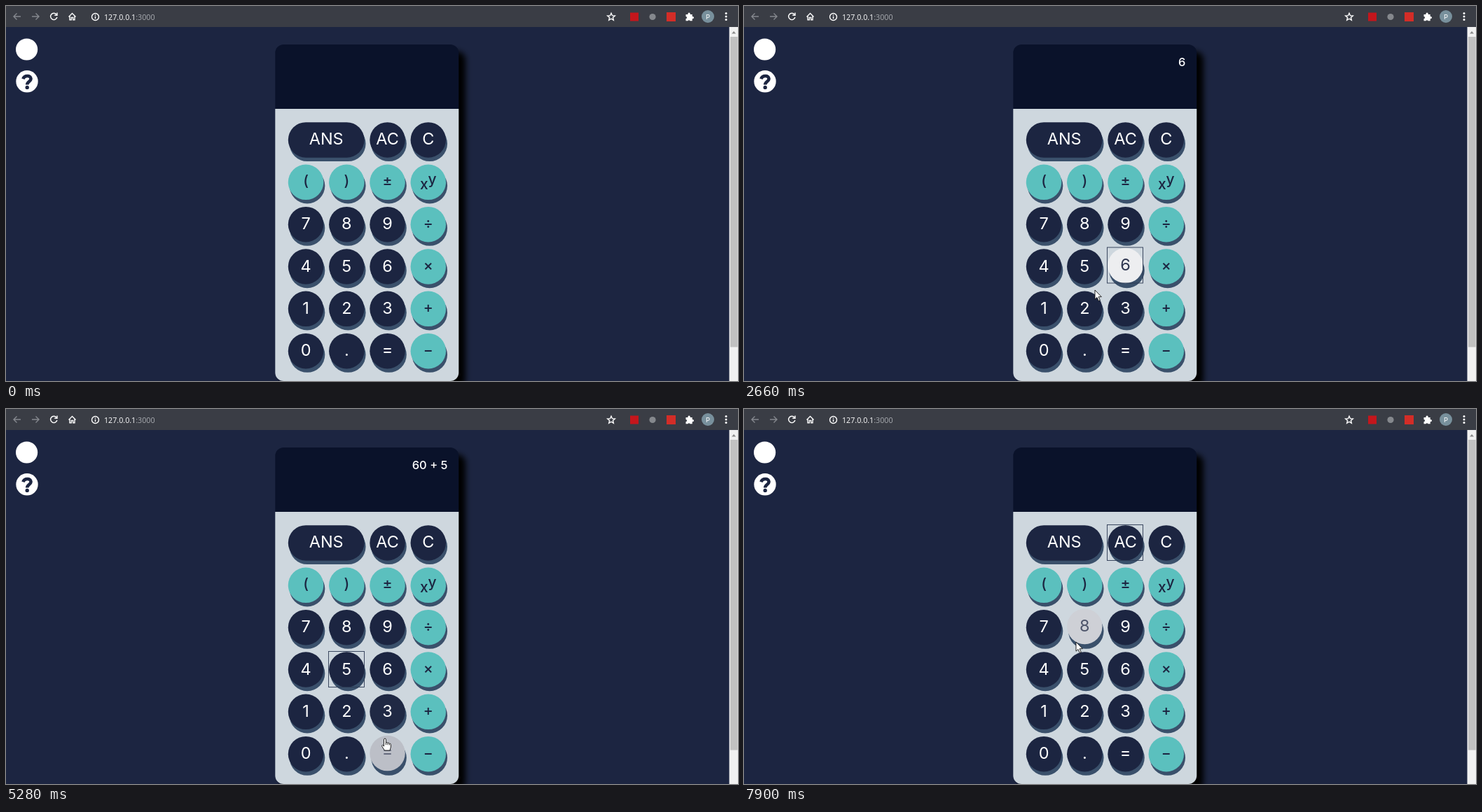
An HTML page that plays this animation: 1045 by 536 pixels, repeating every 8000 ms.

```html
<!DOCTYPE html>
<html lang="en">
<head>
<meta charset="utf-8">
<title>Calculator</title>
<style>
  html, body { margin: 0; width: 100%; height: 100%; overflow: hidden; background: #1c2541; }
  svg { display: block; width: 1045px; height: 536px; }
  text { font-family: Inter, "DejaVu Sans", sans-serif; white-space: pre; }
  .key text { text-anchor: middle; font-size: 23.5px; }
  .key.op text { font-size: 21px; font-weight: 500; }
  .key .shade { fill: #3a506b; }
  .key .focus { fill: none; stroke: #2c3952; stroke-width: .9; }
  .out { fill: #fff; text-anchor: end; font-weight: 500; }
  .url { font: 10.7px "Open Sans", "Noto Sans", sans-serif; fill: #fff; }
  .line { fill: none; stroke: #fff; stroke-width: 1.4; }
  .dim { stroke: #85888e; }
  #cursor path { fill: #fff; stroke: #111; stroke-width: .9; stroke-linejoin: round; }
</style>
</head>
<body>
<svg viewBox="0 0 1045 536">
  <defs>
    <filter id="soft" x="-20%" y="-20%" width="140%" height="140%"><feGaussianBlur stdDeviation="4.5"/></filter>
  </defs>
  <rect width="1045" height="536" fill="#1c2541"/>

  <!-- page links -->
  <circle cx="29.6" cy="62" r="15.6" fill="#fff"/>
  <circle cx="30" cy="107.8" r="15.7" fill="#fff"/>
  <path d="M24.4 104.2C26.2 98.6 35.6 98.8 35.6 104C35.6 108 30.2 108 30.2 112.4" fill="none" stroke="#1c2541" stroke-width="4.6"/>
  <circle cx="30.2" cy="116.4" r="2.7" fill="#1c2541"/>

  <!-- calculator body -->
  <rect x="394" y="65" width="262" height="481" rx="12" filter="url(#soft)"/>
  <path d="M384.3 147h262v377a12 12 0 0 1-12 12h-238a12 12 0 0 1-12-12z" fill="#ced7de"/>
  <path d="M384.3 147V67a12 12 0 0 1 12-12h238a12 12 0 0 1 12 12v80z" fill="#0a122a"/>
  <text class="out" id="expr" x="630.5" y="86" font-size="16.5"></text>
  <text class="out" id="result" x="630.5" y="124" font-size="29"></text>
  <g id="keys"></g>

  <!-- scrollbar -->
  <rect x="1032.5" y="30" width="12.5" height="506" fill="#f1f1f1"/>
  <rect x="1034" y="44" width="10.5" height="443.5" fill="#c1c1c1"/>
  <path d="M1036 39.5l3-3.5 3 3.5z" fill="#8a8a8a"/>

  <!-- browser bar -->
  <rect width="1045" height="30" fill="#3a3d45"/>
  <path class="line dim" d="M21 15H11M15.5 10.5L11 15l4.5 4.5M37 15h10M42.5 10.5L47 15l-4.5 4.5"/>
  <path class="line" d="M72 12a4.7 4.7 0 1 0 .9 4M73 9.5v3.7h-3.7"/>
  <path class="line" d="M89.5 15.5L94.5 10.5l5 5M91 14.5v5.3h2.3v-3.3h2.4v3.3H98v-5.3"/>
  <circle class="line" cx="127.5" cy="15.5" r="5"/>
  <path class="line" d="M127.5 14.7v3.5M127.5 12.4v1.4"/>
  <text class="url" x="140" y="19.5">127.0.0.1<tspan fill="#a9acb1">:3000</tspan></text>
  <path class="line" d="M864 10.2l1.5 3.5 3.8.3-2.9 2.5.9 3.7-3.3-2-3.3 2 .9-3.7-2.9-2.5 3.8-.3z"/>
  <rect x="891" y="9.5" width="12" height="12" fill="#c4161c"/>
  <circle cx="923" cy="15.5" r="4.6" fill="#85888d"/>
  <rect x="943" y="9" width="13" height="13" fill="#d32d27"/>
  <path d="M970.5 12h3v-1a1.6 1.6 0 0 1 3.2 0v1h3v3h.7a1.6 1.6 0 0 1 0 3.2h-.7v3h-3.2a1.6 1.6 0 0 0-3 0h-3v-3a1.6 1.6 0 0 0 0-3.2z" fill="#fff"/>
  <circle cx="1002" cy="15" r="9" fill="#78909c"/>
  <text x="1002" y="18.5" font-size="9.5" fill="#fff" text-anchor="middle">P</text>
  <g fill="#fff"><circle cx="1028" cy="10.5" r="1.5"/><circle cx="1028" cy="15" r="1.5"/><circle cx="1028" cy="19.5" r="1.5"/></g>

  <g id="cursor">
    <path id="arrow" d="M0 0V13.2L3 10.5L5.2 15.5L7.3 14.6L5.1 9.7H9.3Z"/>
    <path id="hand" d="M-1.5 1.2Q-1.3 0 0 0T1.4 1.2V6Q3.2 4.9 4 6.4Q5.7 5.7 6.4 7.2Q8.2 6.7 8.4 8.6V12L7 17H-.5L-4 11.6Q-5 9.6-3.4 9.2L-1.5 11ZM1.4 6v3M4 6.6v2.6M6.4 7.4v2"/>
  </g>
</svg>
<script>
const LOOP = 8000, TICK = 109.4, PHASE = 22;   // the screen refreshes once per tick
const FADE = 200, HOVER_LAG = 30, PRESS_LAG = 100, LIFT = 1.6;
const SIZE = 50.5, REACH = 24;
const NAVY = [28, 37, 65], TEAL = [91, 192, 190], WHITE = [255, 255, 255];
const $ = id => document.getElementById(id);

// Pointer stops: set off, arrive, x, y
const tour = [
  [100, 100, 921, 521],
  [100, 250, 881, 463],
  [400, 790, 649, 405],
  [942, 1502, 490, 363],
  [1640, 1840, 530, 372],
  [2548, 2828, 430, 488],
  [3553, 3733, 600, 437],
  [4450, 4700, 488, 376],
  [4900, 5180, 541, 471],
  [5880, 6050, 572, 370],
  [6050, 6258, 562, 256],
  [6300, 6480, 545, 197],
  [7550, 7898, 474, 333]
];
const presses = [[2330, '6'], [3420, '0'], [4300, '+'], [4850, '5'], [5490, '='], [7140, 'AC']];

const rows = [['ANS', '', 'AC', 'C'], ['(', ')', '±', 'xy'], ['7', '8', '9', '÷'],
  ['4', '5', '6', '×'], ['1', '2', '3', '+'], ['0', '.', '=', '−']];
const keys = [];
rows.forEach((row, r) => row.forEach((name, c) => name && keys.push(makeKey(name, c, r))));

function makeKey(name, c, r) {
  const x = 402.8 + 58.25 * c, y = 166.2 + 60.35 * r;
  const w = name === 'ANS' ? SIZE + 58.25 : SIZE;
  const op = r === 1 || (c === 3 && r > 1);
  const power = name === 'xy';
  const label = power ? 'x<tspan dy="-7">y</tspan>' : name;
  const base = y + SIZE / 2 + (power ? 10 : op || name === '=' ? 5.4 : 7);
  const box = `width="${w}" height="${SIZE}" rx="${SIZE / 2}"`;
  const g = document.createElementNS('http://www.w3.org/2000/svg', 'g');
  g.setAttribute('class', op ? 'key op' : 'key');
  g.innerHTML = `<rect class="shade" x="${x + 2}" y="${y + 5.4}" ${box}/>
    <g><rect x="${x}" y="${y}" ${box}/><text x="${x + w / 2}" y="${base}">${label}</text>
    <rect class="focus" x="${Math.round(x) - .5}" y="${Math.round(y) - .5}" width="51" height="51"/></g>`;
  $('keys').append(g);
  const top = g.querySelector('g');
  const [face, text, focus] = top.children;
  return { name, op, top, face, text, focus, cx: x + w / 2, cy: y + SIZE / 2, spans: [] };
}

const clamp = v => Math.min(1, Math.max(0, v));
const lerp = (a, b, k) => a + (b - a) * k;
const smooth = k => k * k * (3 - 2 * k);
const mix = (a, b, k) => `rgb(${a.map((v, i) => Math.round(lerp(v, b[i], k)))})`;

// CSS "ease": cubic-bezier(.25, .1, .25, 1)
function ease(x) {
  x = clamp(x);
  const bez = (s, p, q) => 3 * s * (1 - s) * ((1 - s) * p + s * q) + s ** 3;
  let lo = 0, hi = 1;
  for (let i = 0; i < 20; i++) {
    const mid = (lo + hi) / 2;
    if (bez(mid, .25, .25) < x) lo = mid; else hi = mid;
  }
  return bez(lo, .1, 1);
}

function pointer(t) {
  const i = Math.max(1, tour.findLastIndex(stop => stop[0] <= t));
  const [go, end, x, y] = tour[i], [, , px, py] = tour[i - 1];
  const k = smooth(clamp((t - go) / (end - go)));
  return [lerp(px, x, k), lerp(py, y, k)];
}

function keyAt(t) {
  const [x, y] = pointer(t);
  return keys.find(k => Math.hypot(x - k.cx, y - k.cy) < REACH);
}

// Walk the tour once and note when each key is hovered
for (let t = 0, prev; t < LOOP; t += 4) {
  const key = keyAt(t);
  if (key && key !== prev) key.spans.push([t, t]);
  if (key) key.spans.at(-1)[1] = t + 4;
  prev = key;
}

function glow(key, t) {
  const now = t - HOVER_LAG;
  return Math.max(0, ...key.spans.map(([a, b]) =>
    ease((Math.min(now, b) - a) / FADE) * (1 - ease((now - b) / FADE))));
}

function screen(t) {
  let expr = '', result = '';
  for (const [at, name] of presses) {
    if (at + PRESS_LAG > t) break;
    if (name === 'AC') expr = result = '';
    else if (name === '=') result = expr.split('+').reduce((sum, n) => sum + Number(n), 0);
    else expr += name === '+' ? ' + ' : name;
  }
  return [expr.trimEnd(), result];
}

function draw(now) {
  const t = Math.max(0, Math.floor((now % LOOP - PHASE) / TICK) * TICK + PHASE);
  const focused = presses.findLast(p => p[0] <= t)?.[1];
  for (const k of keys) {
    const v = glow(k, t);
    k.face.style.fill = mix(k.op ? TEAL : NAVY, WHITE, v);
    k.text.style.fill = mix(k.op ? NAVY : WHITE, NAVY, v);
    k.top.setAttribute('transform', `translate(0 ${-LIFT * v})`);
    k.focus.style.visibility = k.name === focused ? 'visible' : 'hidden';
  }
  [$('expr').textContent, $('result').textContent] = screen(t);

  const [x, y] = pointer(t).map(Math.round);
  const over = keyAt(t);
  $('cursor').setAttribute('transform', `translate(${x} ${y})`);
  $('cursor').style.display = t < tour[0][0] ? 'none' : '';
  $('arrow').style.display = over ? 'none' : '';
  $('hand').style.display = over ? '' : 'none';
}

const start = performance.now();
function frame() {
  draw(performance.now() - start);
  requestAnimationFrame(frame);
}
frame();
</script>
</body>
</html>
```
